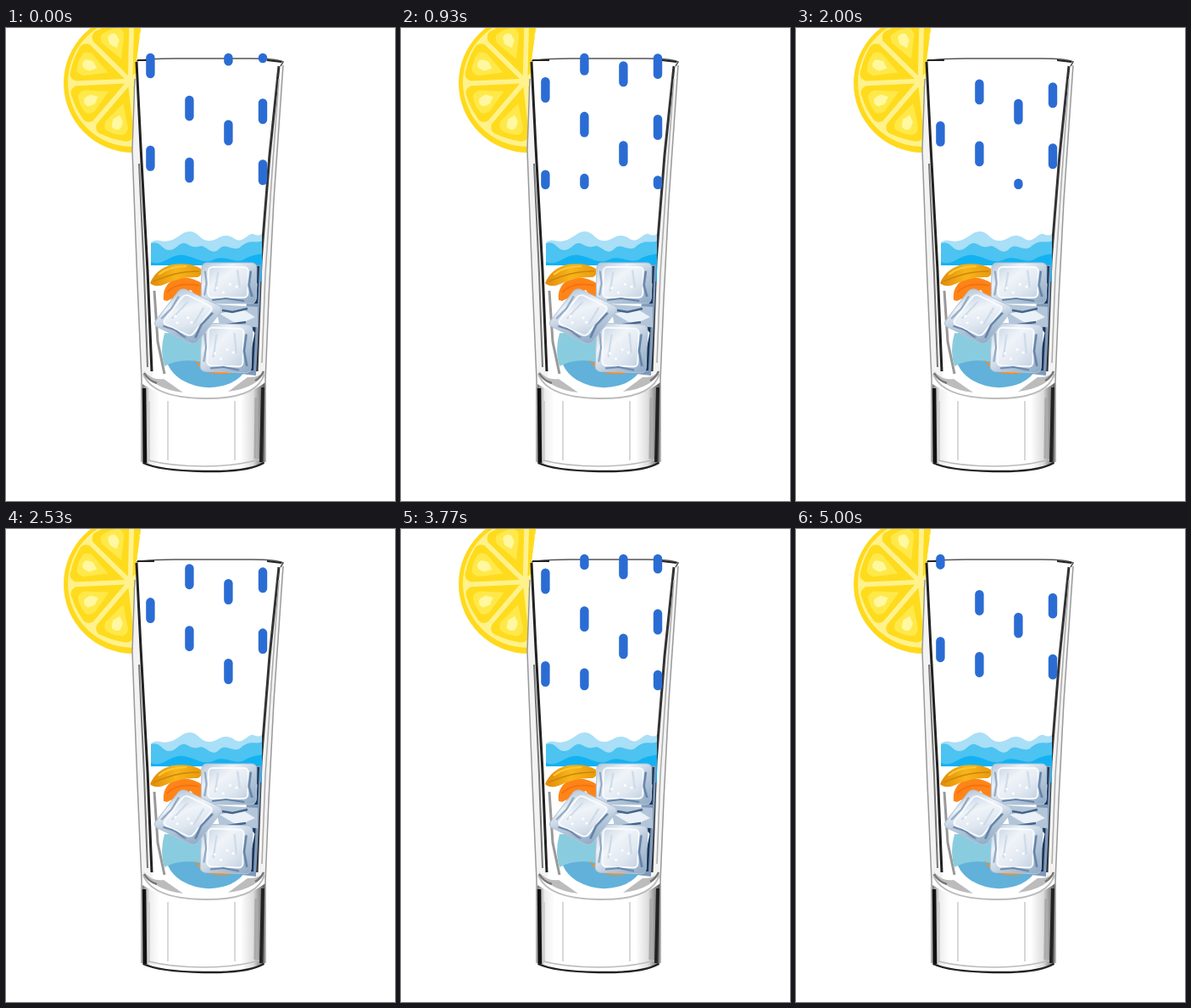
These frames come from a looping animation (459 by 558 pixels, 5030 ms). An HTML page:

```html
<!DOCTYPE html>
<html lang="en">
<head>
<meta charset="utf-8">
<title>Lemon drink</title>
<style>
html, body { margin: 0; width: 100%; height: 100%; overflow: hidden; background: #fff; }
svg { display: block; width: 100%; height: 100%; }
</style>
</head>
<body>
<svg viewBox="0 0 459 558" fill="none">
  <defs>
    <clipPath id="lemonCut"><path d="M0 0H159L154 38L151 100L150 148H0Z"/></clipPath>
    <filter id="soft" x="-50%" y="-10%" width="200%" height="120%"><feGaussianBlur stdDeviation="0.7"/></filter>
    <linearGradient id="face" x1="0" y1="0" x2="1" y2="1">
      <stop offset="0" stop-color="#cbd8e6"/><stop offset=".35" stop-color="#f0f4f9"/>
      <stop offset=".7" stop-color="#dfe7f0"/><stop offset="1" stop-color="#c3d1e1"/>
    </linearGradient>
    <linearGradient id="side" x1="0" y1="0" x2="1" y2="1">
      <stop offset="0" stop-color="#b4c5d8"/><stop offset=".3" stop-color="#eef3f8"/>
      <stop offset=".6" stop-color="#b9cadc"/><stop offset="1" stop-color="#8fa9c5"/>
    </linearGradient>
    <linearGradient id="peel" x1="0" y1="0" x2="1" y2="0">
      <stop offset="0" stop-color="#e08a08"/><stop offset=".5" stop-color="#f7b51b"/><stop offset="1" stop-color="#e99a0c"/>
    </linearGradient>
    <linearGradient id="baseShade" x1="0" y1="0" x2="1" y2="0">
      <stop offset="0" stop-color="#777"/><stop offset=".06" stop-color="#eee"/><stop offset=".14" stop-color="#fff"/>
      <stop offset=".8" stop-color="#fff"/><stop offset=".9" stop-color="#ddd"/><stop offset="1" stop-color="#555"/>
    </linearGradient>
  </defs>

  <g id="lemon" clip-path="url(#lemonCut)">
    <circle cx="150" cy="65" r="82" fill="#ffd91c"/>
    <circle cx="149" cy="64" r="76" fill="#fff28c"/>
  </g>

  <g id="glass">
    <path d="M161 420Q190 439 234 439T306 418L305 514Q270 524 233 524T161 514Z" fill="url(#baseShade)"/>
    <path d="M152 60L149 144L155 300L160 412L173 412L167 286L160 150Z" fill="#f3f3f3"/>
    <path d="M326 46L316 203L306 414L296 410L301 275L311 150Z" fill="#f3f3f3"/>
    <g filter="url(#soft)">
      <path d="M154 39Q165 36 200 36H290Q318 36 327 40L324 45" stroke="#555" stroke-width="1.5"/>
      <path d="M155 38H175M308 38L325 40" stroke="#222" stroke-width="2"/>
      <path d="M152 60L149 144L155 300L160 415V512" stroke="#999" stroke-width="1.5"/>
      <path d="M154 40L159 140L167 286L172 405" stroke="#222" stroke-width="3"/>
      <path d="M157 160L163 290L167 400" stroke="#777" stroke-width="2"/>
      <path d="M175 310L179 370L187 408" stroke="#999" stroke-width="3"/>
      <path d="M327 44L316 203L310 320L306 416V512" stroke="#999" stroke-width="1.5"/>
      <path d="M322 45L311 150L301 275L296 405" stroke="#333" stroke-width="3"/>
      <path d="M322 60L314 170L306 290L302 395" stroke="#aaa" stroke-width="1.5"/>
      <path d="M163 425L164 513" stroke="#111" stroke-width="4.5"/>
      <path d="M169 440V510M191 440V510M270 440V510" stroke="#ccc" stroke-width="1.5"/>
      <path d="M303 424L301 512" stroke="#222" stroke-width="4"/>
      <path d="M295 436L294 508" stroke="#aaa" stroke-width="3"/>
      <path d="M162 513Q180 522 233 523T304 513" stroke="#222" stroke-width="2.5"/>
      <path d="M168 510Q195 517 233 517T299 509" stroke="#bbb" stroke-width="1.5"/>
    </g>
  </g>

  <g id="liquid">
    <path d="M162 404Q172 416 186 414L209 430Q174 426 162 404ZM305 404Q299 413 285 412L262 429Q299 424 305 404Z" fill="#bcbcbc" filter="url(#soft)"/>
    <path d="M162 408Q172 436 234 437T305 408" stroke="#bbb" stroke-width="2" filter="url(#soft)"/>
    <path d="M163 407Q168 416 178 419M294 416Q301 412 304 405" stroke="#777" stroke-width="2.5" filter="url(#soft)"/>
    <path d="M186 365H292Q293 406 265 419Q235 431 207 415Q184 401 186 365Z" fill="#61b1da"/>
    <path d="M187 360H239V396Q208 387 187 399Q181 382 187 360Z" fill="#8accdf"/>
    <path d="M171 253C180 247 184 254 192 251C202 250 207 240 217 240C227 240 229 251 239 251C248 252 252 244 261 245C269 246 271 252 278 250C285 247 287 242 292 243Q298 246 302 243V277H171Z" fill="#a9dff7"/>
    <path d="M171 254C182 250 184 262 192 262C203 262 204 250 214 255C222 260 224 258 231 257C239 260 243 267 250 262C259 251 266 264 276 259C287 248 295 255 302 251V280H171Z" fill="#4cc3f1"/>
    <path d="M171 276C186 282 194 265 210 268C225 271 231 278 244 274C258 266 269 279 281 273C290 267 297 268 302 266V299H291L286 280H171Z" fill="#12b2f2"/>
  </g>

  <g id="orange">
    <path d="M186 321Q184 304 199 296Q217 291 232 302V326L218 309L190 322Z" fill="#ff8418"/>
    <path d="M190 312Q202 299 228 304" stroke="#f57210" stroke-width="2"/>
    <path d="M170 301Q177 284 196 279Q218 276 230 284Q232 292 226 294Q207 293 188 302Q177 307 170 301Z" fill="url(#peel)"/>
    <path d="M174 299Q188 293 200 290T228 287" stroke="#cf850a" stroke-width="1.5"/>
    <path d="M180 291Q192 281 213 281" stroke="#ffca35" stroke-width="2"/>
    <path d="M222 391Q231 408 252 408Q268 409 277 402V398H230Z" fill="#ff8a1c"/>
  </g>

  <g id="ice" stroke-linejoin="round">
    <path d="M285 280L301 279L300 315L295 410L278 408L283 350Z" fill="#7f9aba"/>
    <path d="M297 281L295 325M293 345L290 404" stroke="#1d3759" stroke-width="4" filter="url(#soft)"/>
    <path d="M286 306L295 302L294 318M285 352L292 360L286 389" stroke="#edf4fb" stroke-width="3"/>
    <path d="M247 326L297 329V353L252 351Z" fill="#b3c5d8"/>
    <path d="M252 337L278 331L294 341L274 350Z" fill="#eaf1f8"/>
    <path d="M255 333L267 335L285 331M261 350L283 347" stroke="#44648c" stroke-width="2.5"/>
    <g id="cubes"></g>
  </g>

  <g id="rain" stroke="#2b6cd4" stroke-width="10.4" stroke-linecap="round"></g>
</svg>
<script>
const NS = 'http://www.w3.org/2000/svg';
const byId = id => document.getElementById(id);

function add(parent, tag, attrs) {
  const node = document.createElementNS(NS, tag);
  for (const name in attrs) node.setAttribute(name, attrs[name]);
  return parent.appendChild(node);
}

function drawLemon() {
  const wedge = (inner, outer, half, fill) =>
    `M${inner} 0L${outer - 10} ${-half}Q${outer} ${-half} ${outer} ${-half * .55}` +
    `Q${outer + 2} 0 ${outer} ${half * .55}Q${outer} ${half} ${outer - 10} ${half}Z`;
  for (let i = 1; i <= 6; i++) {
    const g = add(byId('lemon'), 'g', { transform: `translate(146.5 62.5) rotate(${i * 47 + 13})` });
    add(g, 'path', { d: wedge(7, 70, 23), fill: '#ffdb1e' });
    add(g, 'path', { d: wedge(28, 64, 14), fill: '#ffe94a' });
    add(g, 'path', { d: wedge(42, 59, 6), fill: '#fff8a0' });
  }
}

// Each cube is an ice block drawn at the origin and placed by a transform.
function drawCube(transform, w, h) {
  const g = add(byId('cubes'), 'g', { transform });
  const rect = (x, y, rw, rh, r, attrs) => add(g, 'rect', { x, y, width: rw, height: rh, rx: r, ...attrs });
  const line = (d, stroke, width) => add(g, 'path', { d, stroke, 'stroke-width': width, filter: 'url(#soft)' });
  rect(0, 0, w, h, 6, { fill: 'url(#side)', stroke: '#b3c4d6', 'stroke-width': 1 });
  rect(8, 5, w - 18, h - 12, 5, { fill: 'url(#face)', stroke: '#f8fbff', 'stroke-width': 2 });
  line(`M4 ${h * .2}L6 ${h * .5}L4 ${h * .8}`, '#86a0be', 2);
  line(`M${w - 7} ${h * .2}L${w - 9} ${h * .55}L${w - 5} ${h - 8}`, '#5f7fa4', 2.5);
  line(`M${w * .2} ${h - 4}L${w * .45} ${h - 6}L${w - 14} ${h - 3}`, '#6482a6', 2);
  line(`M8 2H${w - 12}`, '#fff', 2);
  line(`M${w * .3} ${h * .22}L${w * .25} ${h * .7}M${w * .65} ${h * .18}L${w * .7} ${h * .6}`, '#cbd8e6', 2);
  for (let i = 0; i < 4; i++)
    add(g, 'circle', { cx: w * (.28 + .12 * i), cy: h * (.62 + .12 * Math.sin(i * 2)), r: 1.6, fill: '#fbfdff' });
}

drawLemon();
drawCube('translate(231 277) skewX(-1)', 65, 48);
drawCube('translate(231 348) rotate(2)', 60, 57);
drawCube('matrix(.91 .44 -.62 .8 207 306)', 55, 55);

const LOOP = 5030, CYCLE = 19, TOP = 35, BOTTOM = 185, HALF = 9.75;
const columns = [
  { x: 170.4, start: 44.2, gap: 109.5 },
  { x: 216.4, start: 21.6, gap: 73 },
  { x: 262.4, start: 29.5, gap: 94 },
  { x: 303, start: 26.2, gap: 72 }
];
const drops = columns.flatMap(column => [-1, 0, 1, 2].map(slot =>
  ({ ...column, slot, line: add(byId('rain'), 'line', { x1: column.x, x2: column.x }) })));

function render(ms) {
  // Rain steps at its own rate, sampled at 25 pictures a second on a 30 Hz clock.
  const tick = Math.floor(ms * .03 + .15);
  const picture = Math.floor(tick * 5 / 6);
  const step = Math.floor(picture * .04 * 26.3);
  const phase = step % CYCLE / CYCLE;
  for (const { start, gap, slot, line } of drops) {
    const y = start + (slot + phase) * gap;
    const from = Math.max(TOP, y - HALF), to = Math.min(BOTTOM, y + HALF);
    line.setAttribute('visibility', to >= from ? 'visible' : 'hidden');
    line.setAttribute('y1', from);
    line.setAttribute('y2', Math.max(from, to) + .01);
  }
}

const began = performance.now();
function frame() {
  render((performance.now() - began) % LOOP);
  requestAnimationFrame(frame);
}
render(0);
requestAnimationFrame(frame);
</script>
</body>
</html>
```
